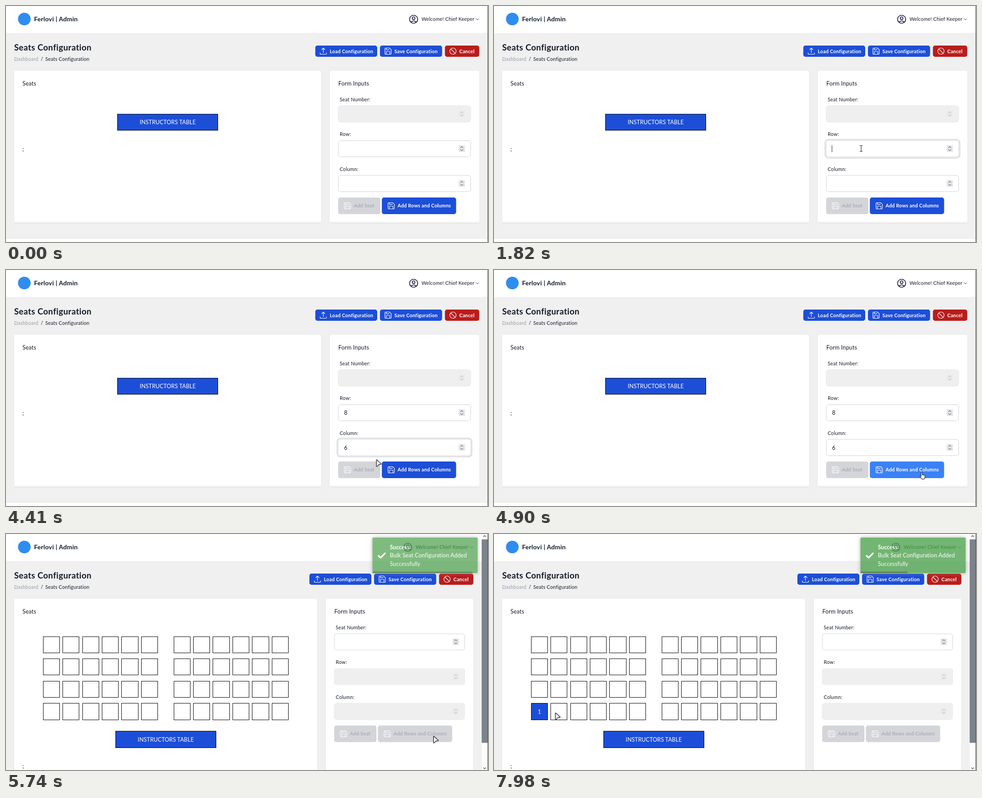
Animation of 1066 by 525 pixels, one loop 8 s. Source, as an HTML page:

```html
<!DOCTYPE html>
<html lang="en">
<head>
<meta charset="utf-8">
<title>Seats Configuration</title>
<style>
html, body { margin: 0; width: 100%; height: 100%; overflow: hidden; background: #f0f0f0; }
svg { display: block; width: 1066px; height: 525px; animation: state 8s step-end infinite; }
text { font: 10.85px Lato, "Open Sans", sans-serif; letter-spacing: .02em; fill: #111827; }
.md { font-size: 12.4px; }
.bold { font-weight: 700; }
.white { fill: #fff; }
.mid { text-anchor: middle; letter-spacing: .007em; }
.line { fill: none; stroke: #fff; stroke-width: 1.5; stroke-linecap: round; stroke-linejoin: round; }
.card { fill: #fff; filter: drop-shadow(0 1px 1px rgb(0 0 0 / .09)); }
.blue { fill: #1d4ed8; }
.crisp { shape-rendering: crispEdges; }

/* layout before and after the seats are added */
.right { transform: translateX(calc(var(--after) * -13px)); }
.form { transform: translateX(calc(var(--after) * -8.7px)); }
.seats { width: calc(679px - var(--after) * 8.5px); height: calc(337.5px + var(--after) * 198.5px); }
.inputs { width: calc(331px - var(--after) * 4.6px); height: calc(337.5px + var(--after) * 198.5px); }
.table { transform: translate(calc(var(--after) * -4.3px), calc(var(--after) * 198.4px)); }
.semi { transform: translateY(calc(var(--after) * 198.4px)); }
.after { opacity: var(--after); }
.before { opacity: calc(1 - var(--after)); }

/* form fields */
.open { --off: calc(1 - var(--after)); }
.shut { --off: var(--after); }
.box { fill: #fff; stroke: #cfd2d8; width: calc(292.8px - var(--after) * 4.6px); }
.off { fill: #efeff0; opacity: var(--off); width: calc(293.8px - var(--after) * 4.6px); }
.spin { transform: translateX(calc(var(--after) * -4.6px)); opacity: calc(1 - var(--off) * .62); }
.ring { fill: #fff; stroke: #c9cbd2; stroke-width: 1.5; }

.bulk { animation: bulk 8s linear infinite; }
.bulk-text { animation: bulk-text 8s linear infinite; }
.toast { opacity: 0; animation: toast 8s ease-in-out infinite; filter: drop-shadow(0 0 4px #999); }
.toast text { letter-spacing: .009em; }
.bar { transform-origin: 810.5px 0; animation: bar 8s linear infinite; }
.pointer { animation: move 8s linear infinite; }
.pointer path { stroke-linejoin: round; stroke-linecap: round; }
.ibeam { opacity: var(--ibeam); }
.arrow { opacity: var(--arrow); }
.hand { opacity: var(--hand); }

@keyframes state {
  0% { --after: 0; --row: 0; --col: 0; --c1: 0; --c2: 0; --c3: 0; --c4: 0;
       --eight: 0; --six: 0; --one: 0; --ibeam: 0; --arrow: 0; --hand: 0; }
  3.5% { --arrow: 1; }
  6.69% { --arrow: 0; --ibeam: 1; }
  7.6% { --arrow: 1; --ibeam: 0; }
  8.6% { --arrow: 0; --ibeam: 1; }
  9.75% { --arrow: 1; --ibeam: 0; }
  11.54% { --arrow: 0; --ibeam: 1; }
  21.875% { --row: 1; --c1: 1; }
  28.875% { --c1: 0; }
  33.25% { --eight: 1; --c2: 1; --ibeam: 0; }
  35% { --ibeam: 1; }
  35.6% { --arrow: 1; --ibeam: 0; }
  36.9% { --arrow: 0; --ibeam: 1; }
  37.625% { --c2: 0; }
  40.25% { --row: 0; --col: 1; --c3: 1; }
  46.375% { --c3: 0; }
  49% { --six: 1; --c4: 1; --ibeam: 0; }
  52.5% { --ibeam: 1; }
  54.2% { --arrow: 1; --ibeam: 0; }
  55.125% { --c4: 0; }
  56% { --arrow: 0; --hand: 1; }
  60.375% { --col: 0; }
  68.25% { --after: 1; --arrow: 1; --hand: 0; }
  91.875% { --one: 1; }
  100% { --after: 1; --row: 0; --col: 0; --c1: 0; --c2: 0; --c3: 0; --c4: 0;
         --eight: 1; --six: 1; --one: 1; --ibeam: 0; --arrow: 1; --hand: 0; }
}
@keyframes move {
  0%, 3.5% { transform: translate(1022px, 508px); }
  6.125% { transform: translate(1008px, 436px); }
  8.75% { transform: translate(880px, 330px); }
  10.5% { transform: translate(768px, 276px); }
  13.125% { transform: translate(842px, 334px); }
  16.6% { transform: translate(790px, 312px); }
  20.125%, 33.25% { transform: translate(812px, 317px); }
  35% { transform: translate(805px, 318px); }
  37.625%, 52.5% { transform: translate(792.7px, 399px); }
  54.25% { transform: translate(802px, 412px); }
  56% { transform: translate(835px, 430px); }
  58.6% { transform: translate(925px, 453px); }
  61.25%, 71.75% { transform: translate(945.7px, 449px); }
  77.875% { transform: translate(620px, 372px); }
  85.75% { transform: translate(63px, 380px); }
  88.375% { transform: translate(92px, 392px); }
  92% { transform: translate(97px, 393px); }
  98.875%, 100% { transform: translate(135.2px, 397px); }
}
@keyframes bulk {
  0%, 56% { fill: #1d4ed8; }
  57.9%, 63% { fill: #3b82f6; }
  64.75%, 68.24% { fill: #3478ee; }
  68.25% { fill: #97b4e5; }
  69.8%, 100% { fill: #d4d5d9; }
}
@keyframes bulk-text {
  0%, 68.24% { fill: #fff; }
  68.25% { fill: #aabce3; }
  69.8%, 100% { fill: #abaeb8; }
}
@keyframes toast {
  0%, 68.75% { opacity: 0; }
  72.5%, 100% { opacity: .8; }
}
@keyframes bar {
  0%, 69.125% { transform: scaleX(1); }
  100% { transform: scaleX(.442); }
}
</style>
</head>
<body>
<svg viewBox="0 0 1066 525">
  <defs>
    <g id="save"><path class="line" transform="scale(.775) translate(-12 -12)" d="M19 21H5a2 2 0 0 1-2-2V5a2 2 0 0 1 2-2h11l5 5v11a2 2 0 0 1-2 2zM17 21v-8H7v8M7 3v5h8"/></g>
    <g id="field">
      <rect class="box" x="734.9" y=".5" height="36" rx="4.7"/>
      <rect class="off" x="734.4" y="0" height="37" rx="4.7"/>
      <g class="spin">
        <rect x="1001" y="11" width="14" height="14.5" fill="#e5e5ea"/>
        <path d="M1005 16.5l3-3 3 3M1005 20l3 3 3-3" fill="none" stroke="#77777f" stroke-width="1.1"/>
      </g>
    </g>
    <rect id="seat" x="82.2" y="228.1" width="36.2" height="36.2" fill="#fff" stroke="#000"/>
    <g id="trio"><use href="#seat"/><use href="#seat" x="43.4"/><use href="#seat" x="86.8"/></g>
    <g id="half"><use href="#trio"/><use href="#trio" x="130.2"/></g>
    <g id="seat-row"><use href="#half"/><use href="#half" x="289"/></g>
  </defs>

  <rect width="1066" height="525" fill="#f0f0f0"/>
  <rect width="1066" height="60" fill="#fff"/>
  <rect class="before" y="518" width="1066" height="7" fill="#fff"/>

  <circle cx="40.5" cy="29" r="14" fill="#2f8df0"/>
  <text class="bold" x="62" y="34" style="font-size:13.95px">Ferlovi | Admin</text>
  <text class="bold" x="18" y="98.5" style="font-size:18.6px;letter-spacing:.024em">Seats Configuration</text>
  <text x="18" y="121.9" style="fill:#9a9da5">Dashboard</text>
  <text x="77" y="121.9">/</text>
  <text x="87" y="121.9">Seats Configuration</text>

  <g class="right">
    <path class="line" style="stroke:#1c1b3a;stroke-width:1.7" transform="translate(901.5 29.5) translate(-12 -12)" d="M17.98 18.73A7.49 7.49 0 0 0 12 15.75a7.49 7.49 0 0 0-5.98 2.98m11.96 0a9 9 0 1 0-11.96 0m11.96 0A8.97 8.97 0 0 1 12 21a8.97 8.97 0 0 1-5.98-2.27M15 9.75a3 3 0 1 1-6 0 3 3 0 0 1 6 0z"/>
    <text x="919" y="33.4">Welcome! Chief Keeper</text>
    <path class="line" style="stroke:#74758a;stroke-width:1.1" d="M1040 28.2l2.8 2.8 2.8-2.8"/>

    <rect class="blue" x="684" y="88" width="137" height="25" rx="4.7"/>
    <path class="line" transform="translate(701.8 100.5) scale(.775) translate(-12 -12)" d="M3 16.5v2.25A2.25 2.25 0 0 0 5.25 21h13.5A2.25 2.25 0 0 0 21 18.75V16.5M7.5 7.5L12 3l4.5 4.5M12 3v13.5"/>
    <text class="bold white" x="716" y="104.7">Load Configuration</text>
    <rect class="blue" x="827" y="88" width="137.5" height="25" rx="4.7"/>
    <use href="#save" x="845" y="100.5"/>
    <text class="bold white" x="859" y="104.7">Save Configuration</text>
    <rect x="970.7" y="88" width="76" height="25" rx="4.7" fill="#b91c1c"/>
    <path class="line" style="stroke-width:1.2" d="M995.5 100.5a7 7 0 1 1-14 0 7 7 0 0 1 14 0M983.5 95.5l10 10"/>
    <text class="bold white" x="1002.5" y="104.7">Cancel</text>
  </g>

  <rect class="card seats" x="18" y="144" rx="4"/>
  <text class="md" x="36.5" y="176.5">Seats</text>
  <g class="after crisp">
    <use href="#seat-row"/>
    <use href="#seat-row" y="49.6"/>
    <use href="#seat-row" y="99.2"/>
    <use href="#seat-row" y="148.8"/>
  </g>
  <g style="opacity:var(--one)">
    <rect class="blue crisp" x="82.2" y="376.9" width="36.2" height="36.2" stroke="#000"/>
    <text class="md white mid" x="100.4" y="399.6">1</text>
  </g>
  <g class="table">
    <rect class="blue crisp" x="246.6" y="240.5" width="222.2" height="36.2" stroke="#000"/>
    <text class="md white mid" x="357.7" y="263.3">INSTRUCTORS TABLE</text>
  </g>
  <text class="md semi" x="36.5" y="322.5">;</text>

  <g class="form">
    <rect class="card inputs" x="716" y="144" rx="4"/>
    <text class="md" x="735" y="176.5">Form Inputs</text>
    <text x="738" y="211.8">Seat Number:</text>
    <text x="738" y="289.1">Row:</text>
    <text x="738" y="366.6">Column:</text>
    <rect class="ring" x="732.3" y="296.8" width="298" height="41.4" rx="7.5" style="opacity:var(--row)"/>
    <rect class="ring" x="732.3" y="374.2" width="298" height="41.4" rx="7.5" style="opacity:var(--col)"/>
    <use class="open" href="#field" y="221.5"/>
    <use class="shut" href="#field" y="299"/>
    <use class="shut" href="#field" y="376.4"/>
    <g class="before">
      <text class="md" x="747.7" y="322" style="opacity:var(--eight)">8</text>
      <text class="md" x="747.7" y="399.5" style="opacity:var(--six)">6</text>
      <g fill="#222">
        <rect x="747" y="310" width="1" height="15" style="opacity:var(--c1)"/>
        <rect x="755" y="310" width="1" height="15" style="opacity:var(--c2)"/>
        <rect x="747" y="388" width="1" height="15" style="opacity:var(--c3)"/>
        <rect x="755" y="388" width="1" height="15" style="opacity:var(--c4)"/>
      </g>
    </g>
    <rect x="734.5" y="426" width="93.5" height="37" rx="4.7" fill="#d4d5d9"/>
    <use href="#save" x="755.3" y="444.5"/>
    <text class="bold" x="769.5" y="448.4" style="fill:#abaeb8">Add Seat</text>
    <rect class="bulk" x="831.2" y="426" width="164.3" height="37" rx="4.7"/>
    <use href="#save" x="852" y="444.5"/>
    <text class="bold bulk-text" x="866" y="448.4">Add Rows and Columns</text>
  </g>

  <g class="after">
    <rect x="1052" width="13" height="525" fill="#fcfcfc"/>
    <rect x="1052" y="12" width="13" height="452.5" fill="#7c838b"/>
    <path d="M1055.5 6.5l3-3 3 3M1055.5 519.5l3 3 3-3" fill="none" stroke="#55585e" stroke-width="1.3"/>
  </g>
  <rect x="1065" width="1" height="525" fill="#4a4b50"/>

  <g class="toast">
    <rect x="810.5" y="8" width="232.5" height="79" rx="2.3" fill="#51a351"/>
    <path d="M823 47.5l5.5 5.2L839 42" fill="none" stroke="#fff" stroke-width="3.6"/>
    <text class="md bold white" x="849" y="33.5">Success</text>
    <text class="md white" x="849" y="52">Bulk Seat Configuration Added</text>
    <text class="md white" x="849" y="70.6">Successfully</text>
    <rect class="bar" x="810.5" y="83.9" width="232.5" height="3.1" opacity=".4"/>
  </g>

  <g class="pointer">
    <path class="ibeam" d="M-2.5-6.5h1.6q.9 0 .9.9V5.6q0 .9-.9.9h-1.6M2.5-6.5H.9q-.9 0-.9.9M2.5 6.5H.9Q0 6.5 0 5.6" fill="none" stroke="#222" stroke-width="1.1"/>
    <path class="arrow" transform="translate(0 .5) scale(1.05)" d="M.5.9Q.6 0 1.4.7L10.3 8.8q.9 1-.5 1.2l-4 .5L2.2 14.3Q.6 15.4.5 13.7Z" fill="#fff" stroke="#26262e" stroke-width="1.4"/>
    <path class="hand" d="M-1.3 1.6a1.3 1.3 0 0 1 2.6 0V6.4l4.5 1.1q1.9.5 1.7 2.6l-.6 4q-.3 2.2-2.2 2.2H1.6q-1 0-1.7-.9l-4-4.7q.7-1.6 2.2-.5l.6.5Z" fill="#fff" stroke="#26262e" stroke-width="1.2"/>
  </g>
</svg>
</body>
</html>
```
